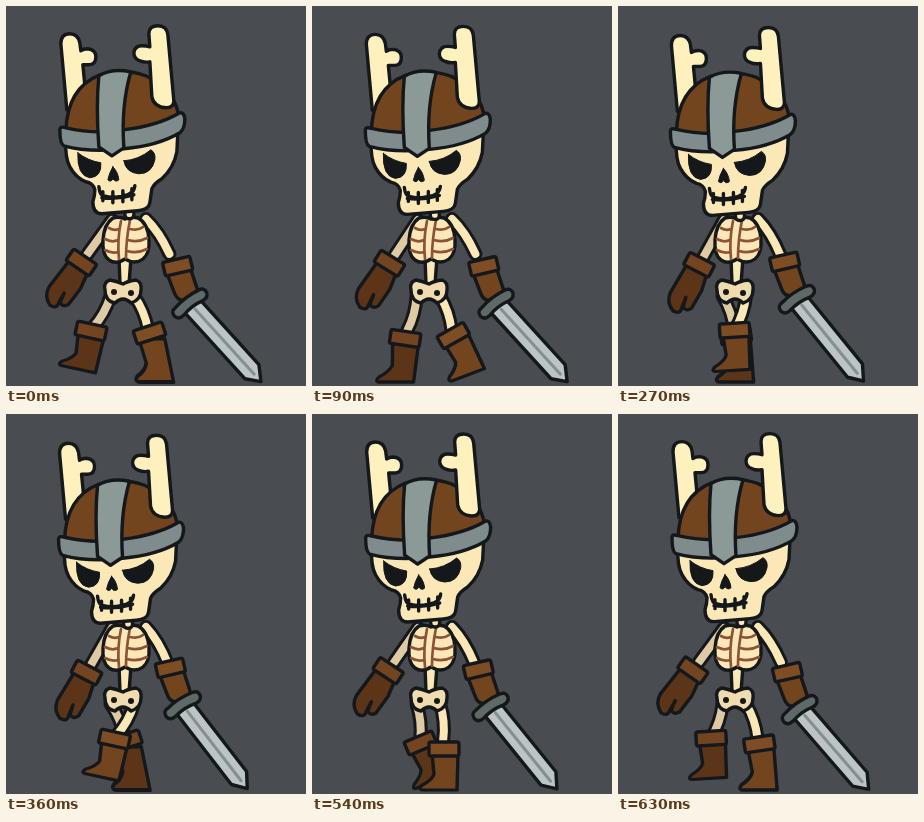
Write an HTML page without scripts that moves like this. It is 300 by 380 pixels and loops after 720 ms.

```html
<!DOCTYPE html>
<html lang="en">
<head>
<meta charset="utf-8">
<title>Skeleton warrior walk</title>
<style>
/* One walk cycle is a full turn of --t, held in eight poses. */
@property --t { syntax: "<angle>"; inherits: true; initial-value: 0deg; }
@keyframes walk { from { --t: 0deg; } to { --t: 360deg; } }

html, body { margin: 0; width: 100%; height: 100%; overflow: hidden; background: #494c51; }
svg {
  display: block; width: 100%; height: 100%;
  animation: walk .72s steps(8) infinite;
  --swing: cos(var(--t) - 25deg);
  --reach: cos(var(--t) + 35deg);
}

path, rect { stroke: #14181b; stroke-width: 3.4; stroke-linejoin: round; stroke-linecap: round; }
.bone { fill: #fbe8b6; }
.horn { fill: #fff1bd; }
.hip { fill: #f0dcae; }
.far { fill: #5c3417; }
.near { fill: #72451f; }
.cuff-far { fill: #734420; }
.cuff-near { fill: #7e4d24; }
.steel { fill: #7f8b8c; }
.strap { fill: #8b9997; }
.guard { fill: #5f6968; }
.blade { fill: #bcc5c6; }
.dark { fill: #14181b; stroke-width: 1; }
.line { fill: none; }
.rib { fill: none; stroke: #8d5338; stroke-width: 2.7; }
.limb { fill: none; stroke-width: 14; }
.core { fill: none; stroke: #fbe8b6; stroke-width: 8; }
.shade { stroke: #e0caa4; }
.fuller { stroke: #858f90; stroke-width: 3; }

.head { transform: translate(calc((var(--reach) - 1) * .8px), calc((.6 - var(--reach)) * .9px)); }

/* Arms: each bone points from its shoulder to the glove. */
.arm-far { --x: calc(78 - 3.2 * var(--reach)); --y: calc(257.5 - 1.3 * var(--reach)); --sx: 106; --sy: 214; }
.arm-near { --x: calc(168 + 4 * var(--swing)); --y: calc(257 + 3.5 * var(--swing)); --sx: 140; --sy: 213; }
.upper {
  transform: translate(calc(var(--sx) * 1px), calc(var(--sy) * 1px))
    rotate(atan2(var(--sx) - var(--x), var(--y) - var(--sy)));
}
.end { transform: translate(calc(var(--x) * 1px), calc(var(--y) * 1px)); }
.glove-far { transform: rotate(calc(31deg + 4deg * var(--reach))); }
.glove-near { transform: rotate(-13deg); }
.sword { transform: translate(12px, 37px) rotate(calc(50deg - 2.5deg * var(--swing))); }

/* Legs: the same gait, half a cycle apart. --air is 1 in swing, 0 on the ground. */
.leg {
  --stride: calc(-17.5 * cos(var(--phi)) - 3 * cos(2 * var(--phi)));
  --x: calc(var(--mid) + var(--stride));
  --y: calc(329 + 3 * sin(var(--phi)) - cos(var(--phi)) - 3 * cos(2 * var(--phi)) + 2 * sin(2 * var(--phi)));
  --tilt: calc(12deg * cos(var(--phi)) - 24deg * max(0, cos(var(--phi) - 255deg)));
  --air: clamp(0, cos(var(--phi)) - 2 * sin(var(--phi)), 1);
}
.leg-far { --phi: var(--t); --mid: 105.5; }
.leg-near { --phi: calc(var(--t) + 180deg); --mid: 129; }
.thigh {
  transform: translate(calc(var(--mid) * 1px - 1px), 290px)
    rotate(atan2(-1 - var(--stride), var(--y) - 290));
}
.foot {
  transform: rotate(calc(var(--tilt) * var(--air)))
    skewX(calc(var(--tilt) * -.7 * (1 - var(--air))))
    scaleY(calc(.91 * var(--air) + (376 - var(--y)) / 44 * (1 - var(--air))));
}
.cuff { transform: rotate(var(--tilt)); }
</style>
</head>
<body>
<svg viewBox="0 0 300 380">
<defs>
  <path id="boot" d="M-12 5L-10 27Q-12 33 -22 39Q-26 43 -22 44H13L14 5Z"/>
  <rect id="band" x="-15" y="-7" width="30" height="14" rx="2"/>
  <rect id="wrist" x="-14" y="-7" width="28" height="14" rx="2"/>
</defs>

<g class="arm-far">
  <g class="upper"><path class="limb" d="M0 0V42"/><path class="core shade" d="M0 0V42"/></g>
  <g class="end"><g class="glove-far">
    <path class="far" d="M-11 5L-13 38Q-12 49 -2 53Q6 53 4 46L3 35L5 45Q10 48 13 42L14 22L11 5Z"/>
    <use href="#wrist" class="cuff-far"/>
  </g></g>
</g>

<g class="leg leg-far">
  <g class="thigh"><path class="limb" d="M0 0Q4 18 0 36"/><path class="core shade" d="M0 0Q4 18 0 36"/></g>
  <g class="end">
    <g class="foot far"><use href="#boot"/></g>
    <g class="cuff cuff-far"><use href="#band"/></g>
  </g>
</g>

<g class="leg leg-near">
  <g class="thigh"><path class="limb" d="M0 0Q4 18 0 36"/><path class="core" d="M0 0Q4 18 0 36"/></g>
  <g class="end">
    <g class="foot near"><use href="#boot"/></g>
    <g class="cuff cuff-near"><use href="#band"/></g>
  </g>
</g>

<!-- spine and pelvis -->
<path class="bone" d="M113 252L114 278H123L125 252Z"/>
<path class="hip" d="M104 274Q97 276 99 284Q99 295 109 297Q113 293 117 293Q121 293 125 297Q135 294 135 284Q136 276 130 274Q122 275 117 278Q110 275 104 274Z"/>
<circle class="dark" cx="108" cy="286" r="3"/><circle class="dark" cx="125" cy="287" r="3"/>

<g class="arm-near upper"><path class="limb" d="M0 0Q4 18 0 42"/><path class="core" d="M0 0Q4 18 0 42"/></g>

<!-- ribs -->
<path class="bone" d="M119 213Q114 210 107 212Q98 218 97 234Q96 249 103 254Q110 259 119 253Q129 259 137 253Q144 247 143 234Q142 217 132 212Q125 210 119 213Z"/>
<path class="rib" d="M115 215Q111 234 113 253M124 214Q120 234 120 252M103 222Q108 225 113 223M99 233Q106 237 112 234M99 244Q106 248 112 246M124 223Q132 225 137 221M122 234Q132 237 141 232M121 245Q131 248 141 243"/>

<g class="arm-near"><g class="end">
  <g class="glove-near">
    <path class="near" d="M-12 5L-9 26Q-8 35 2 35Q12 34 14 27L12 5Z"/>
    <use href="#wrist" class="cuff-near"/>
  </g>
  <g class="sword">
    <path class="blade" d="M2 -10H92L106 0L93 10H2Z"/>
    <path class="fuller" d="M8 0H96"/>
    <path class="guard" d="M-5 -15Q-4 -21 2 -20Q7 -18 6 -12Q3 0 6 12Q7 19 1 20Q-5 20 -5 14Q-8 0 -5 -15Z" transform="rotate(5)"/>
  </g>
</g></g>

<g class="head">
  <rect class="bone" x="119" y="202" width="9" height="11" rx="4"/>
  <path class="horn" d="M61 104L55 38Q55 28 64 28Q72 28 74 37L75 45Q77 43 82 43Q90 44 90 51Q90 59 83 59L77 59L81 100Z"/>
  <path class="bone" d="M60 134Q59 152 64 161Q70 172 80 176Q87 177 89 184Q89 190 87 196Q87 208 96 208L132 205Q143 204 144 197L146 183Q148 178 156 173Q168 162 171 146L172 126Z"/>
  <path class="near" d="M60 126Q61 82 94 69Q118 62 140 70Q170 84 173 112L118 136Z"/>
  <path class="steel" d="M54 124Q54 120 60 122Q90 129 118 124Q152 120 174 107Q178 106 179 113Q179 123 174 127Q152 140 118 143Q84 147 58 140Q54 138 54 124Z"/>
  <path class="strap" d="M93 70Q90 100 93 141L106 150L118 142Q115 100 125 66Q106 62 93 70Z"/>
  <path class="horn" d="M143 28Q143 20 152 20Q161 20 162 29L168 95Q168 102 160 102Q148 101 146 91L144 56Q138 57 134 55Q128 53 128 47Q129 40 136 40Q141 40 144 41Z"/>
  <path class="dark" d="M72 147Q82 155 95 157Q96 171 84 172Q71 170 72 147Z"/>
  <path class="dark" d="M118 155Q133 154 145 144Q150 147 149 154Q146 168 133 168Q120 167 118 155Z"/>
  <path class="dark" d="M107 161Q103 168 102 174Q105 177 107 173Q110 177 113 174Q112 166 107 161Z"/>
  <path class="line" stroke-width="5" d="M93 181Q94 190 98 190Q107 193 117 190Q128 189 129 180M97 186V195M107 186V197M117 185V196M126 183V194"/>
  <path class="line" d="M96 192Q112 194 128 189"/>
</g>
</svg>
</body>
</html>
```
